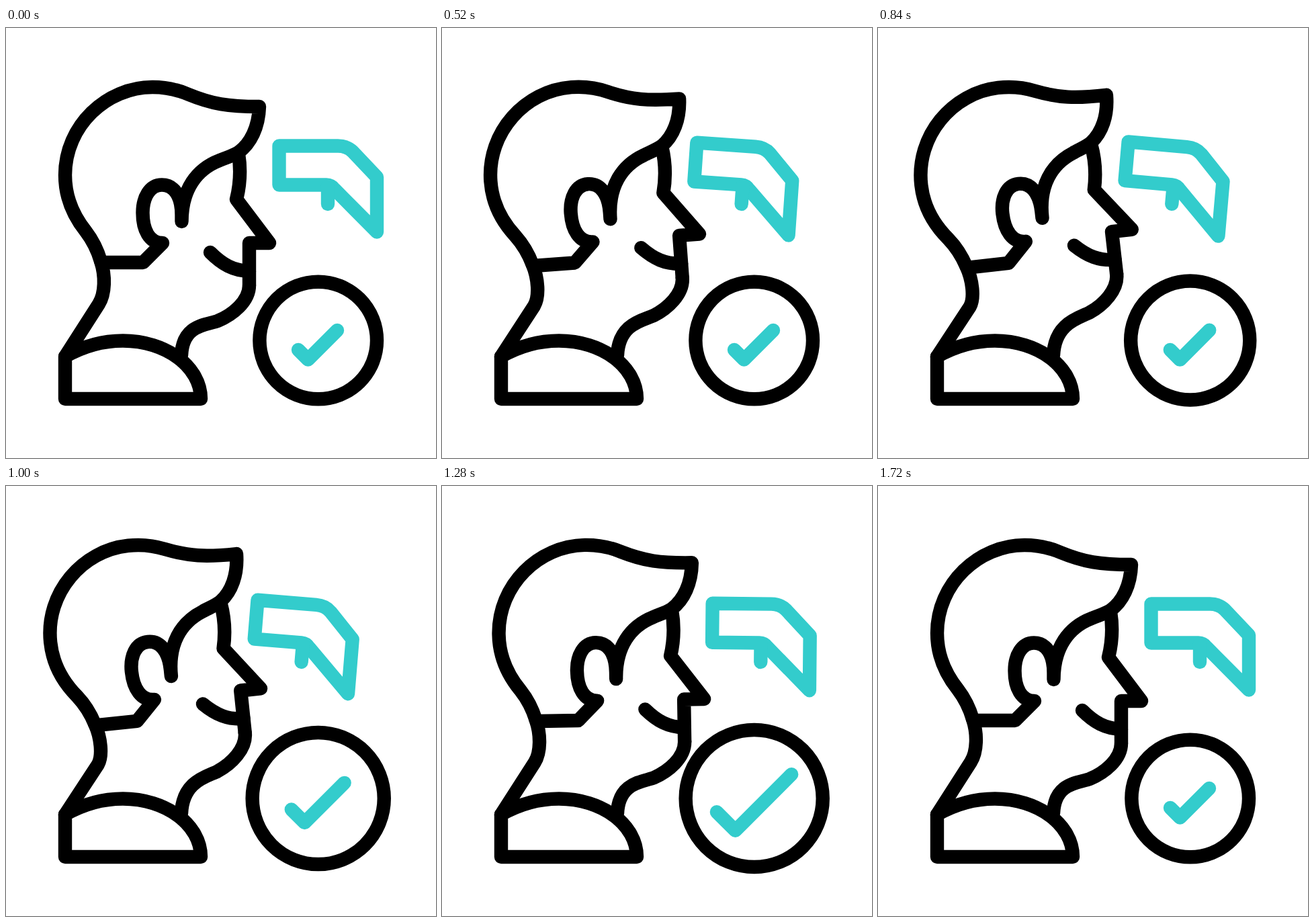
An HTML page that plays this animation: 640 by 640 pixels, repeating every 1.88 s.

```html
<!DOCTYPE html>
<html lang="en">
<head>
<meta charset="utf-8">
<title>Head profile with check</title>
<style>
  html, body { margin: 0; width: 100%; height: 100%; overflow: hidden; background: #fff; }
  svg { display: block; width: 100%; height: 100%; }
  path, circle { fill: none; stroke: #000; stroke-width: 20.4; stroke-linecap: round; stroke-linejoin: round; }
  .teal { stroke: #33cccc; }
</style>
</head>
<body>
<svg viewBox="0 0 640 640">
  <path d="M88 489C116 473 144 465.500 174 465.500C238 465.500 290 504 290 552H88Z"/>
  <path id="neck"/>
  <path id="jaw"/>
  <g id="head">
    <path d="M141 347C136 330 129 316 119 303C99 278 88 250 88 219C88 145 150 88 218 88C238 88 256 92 272 99C306 113 330 117 377 117C376 148 364 172 346 185C336 191 327 193 318 197C284 210 261.500 240 261.500 288V278C261.500 250 250 233.500 232 233.500C214 233.500 203.500 252 203.500 275C203.500 300 213 320 233 320L204 349H146"/>
    <path d="M346 187C350 212 348 235 343 255L392 320H362V383"/>
    <path d="M304 334C322 352 338 361 362 362"/>
  </g>
  <g id="hand">
    <path class="teal" d="M406.500 175.500H494C503 175.500 510 178 516 184L552 222V303.500L489 240C486 236 482 233.500 477 233.500H406.500Z"/>
    <path class="teal" d="M479 235V262"/>
  </g>
  <circle id="ring" cx="464.700" cy="465"/>
  <path id="check" class="teal"/>
</svg>
<script>
const LOOP = 1880, TICK = 40;
const TILT = -6.5, PIVOT = [207, 435];
const $ = id => document.getElementById(id);
const [neck, jaw, head, hand, ring, check] =
  ['neck', 'jaw', 'head', 'hand', 'ring', 'check'].map($);

// Symmetric cubic-bezier(.6, 0, .4, 1)
function ease(x) {
  if (x <= 0) return 0;
  if (x >= 1) return 1;
  let lo = 0, hi = 1, s;
  for (let i = 0; i < 24; i++) {
    s = (lo + hi) / 2;
    const bx = 1.8 * s * (1 - s) ** 2 + 1.2 * s * s * (1 - s) + s ** 3;
    if (bx < x) lo = s; else hi = s;
  }
  return s * s * (3 - 2 * s);
}

// Goes out during a..b and returns during c..d
const swing = (t, a, b, c, d) => ease((t - a) / (b - a)) - ease((t - c) / (d - c));

// Rotates a point with the head; weight 0 leaves it in place
function turner(angle) {
  return (x, y, weight = 1) => {
    const r = angle * weight * Math.PI / 180;
    const dx = x - PIVOT[0], dy = y - PIVOT[1];
    const cos = Math.cos(r), sin = Math.sin(r);
    return `${PIVOT[0] + dx * cos - dy * sin} ${PIVOT[1] + dx * sin + dy * cos}`;
  };
}

function draw(t) {
  const tilt = TILT * swing(t, 160, 800, 840, 1480);
  const p = turner(tilt);
  head.setAttribute('transform', `rotate(${tilt} ${PIVOT})`);
  neck.setAttribute('d', `M88 489L${p(138, 411, 0.5)}C${p(148, 395)} ${p(148, 368)} ${p(141, 347)}`);
  jaw.setAttribute('d', `M${p(362, 383)}C${p(362, 407)} ${p(337, 427)} ${p(315, 436)}` +
    `C${p(299, 442)} ${p(263, 441, 0.3)} 261 487`);

  const reach = swing(t, 160, 720, 880, 1440);
  hand.setAttribute('transform', `translate(${-39.7 * reach} 0) rotate(${5 * reach} 479 239)`);

  ring.setAttribute('r', 87.3 + 15.5 * swing(t, 720, 1200, 1200, 1600));

  const k = swing(t, 800, 1240, 1240, 1720);
  check.setAttribute('d', `M${435 - 26.3 * k} ${479 + 6.3 * k}` +
    `L${449.5 - 13 * k} ${493.5 + 19.5 * k}L${493 + 27.4 * k} ${450 - 21 * k}`);
}

function frame(now) {
  draw(Math.floor(now % LOOP / TICK) * TICK);
  requestAnimationFrame(frame);
}
draw(0);
requestAnimationFrame(frame);
</script>
</body>
</html>
```
